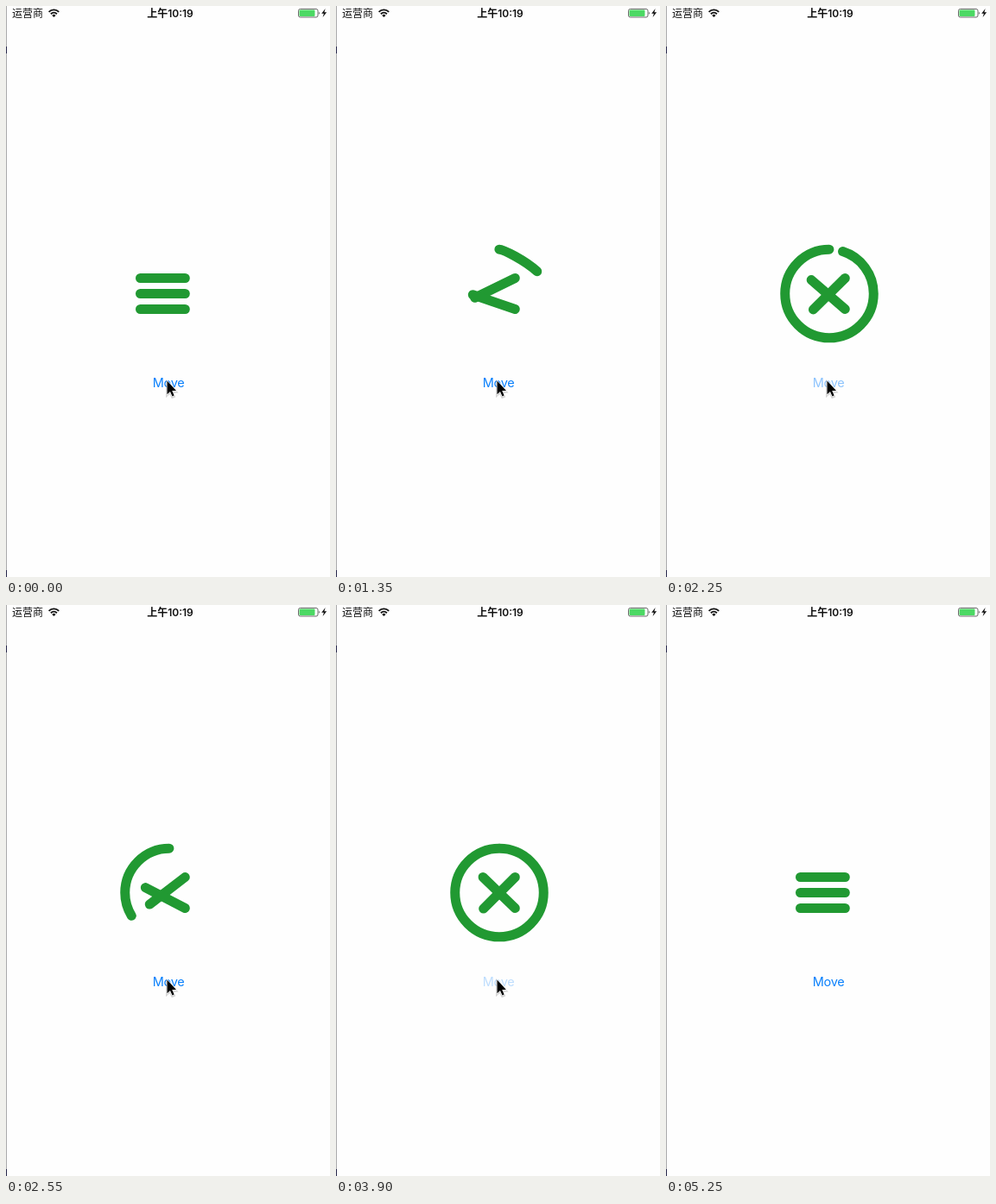
Animation of 375 by 662 pixels, one loop 5500 ms. Source, as an HTML page:

```html
<!DOCTYPE html>
<html lang="zh">
<head>
<meta charset="utf-8">
<title>Menu button</title>
<style>
  html, body { margin: 0; width: 100%; height: 100%; overflow: hidden; background: #fefefe; }
  svg { display: block; width: 375px; height: 662px; }
  text { font-family: Inter, "Noto Sans CJK SC", "Noto Sans CJK", sans-serif; font-size: 12px; fill: #111; }
  #icon { fill: none; stroke: #219932; stroke-width: 11; stroke-linecap: round; stroke-linejoin: round; }
  #label { font-size: 14.5px; letter-spacing: -.3px; fill: #0a80fc; }
</style>
</head>
<body>
<svg viewBox="0 0 375 662">
  <rect width="375" height="662" fill="#fefefe"/>

  <!-- window edge -->
  <path d="M.5 0V662" stroke="#a9a9ab"/>
  <path d="M.5 47V55M.5 654V662" stroke="#26264a"/>

  <!-- status bar -->
  <text x="7" y="12.6">运营商</text>
  <g fill="none" stroke="#111" stroke-width="1.9">
    <path d="M49.6 6.8A8.2 8.2 0 0 1 61.2 6.8"/>
    <path d="M51.9 9.2A5 5 0 0 1 58.9 9.2"/>
  </g>
  <path d="M55.4 13L53.3 10.9A3 3 0 0 1 57.5 10.9Z" fill="#111"/>
  <text x="190" y="12.6" text-anchor="middle" font-weight="600">上午10:19</text>
  <rect x="338.5" y="3.5" width="22.5" height="9.5" rx="2" fill="none" stroke="#5a5a5a" stroke-width=".9"/>
  <rect x="339.5" y="4.5" width="18" height="7.5" rx="1" fill="#4cd964"/>
  <path d="M362 6.5Q363.6 8.2 362 10Z" fill="#333"/>
  <path d="M369.6 3L365.2 8.8H367.9L366.6 13L371.2 7.2H368.4Z" fill="#111"/>

  <g id="icon">
    <path id="top" d="M155.5 315.5H207.3"/>
    <path id="mid" d="M155.5 333.5H207.3C291 333.5 198 282.2 189 282.2A51.3 51.3 0 0 0 189 384.8A51.3 51.3 0 0 0 189 282.2"/>
    <path id="bottom" d="M155.5 351.5H207.3"/>
  </g>

  <text id="label" x="169.8" y="442.2">Move</text>

  <g id="cursor">
    <path d="M0 1.5V18L3.7 14.6L6.3 20L8.9 18.9L6.5 13.5H11.3Z" fill="#000" opacity=".16" stroke="#000" stroke-width="2"/>
    <path d="M.5 .5V16.2L4 12.9L6.5 18.4L8.6 17.5L6.2 12.1H11Z" fill="#000" stroke="#fff" stroke-width="1.1" paint-order="stroke"/>
  </g>
</svg>
<script>
  const LOOP = 5500, STEP = 150, DURATION = 1000, FADE = 0.28;
  const RUNS = [
    { press: 600, start: 770 },
    { press: 2100, start: 2160 },
    { press: 3900, start: 3880 }
  ];
  const CURSOR = [[0, 186, 434], [4350, 201, 443], [4500, 216, 452], [4950, 372, 658], [5250, 400, 700]];

  const [top_, mid, bottom, label, cursor] =
    ["top", "mid", "bottom", "label", "cursor"].map(id => document.getElementById(id));
  const total = mid.getTotalLength();
  const ring = 2 * Math.PI * 51.3;
  const bar = 51.8;
  const ringStart = total - ring;

  const clamp = v => Math.max(0, Math.min(1, v));
  const mix = (a, b, p) => a + (b - a) * p;

  function bezier(x1, y1, x2, y2) {
    const at = (a, b, u) => 3 * a * u * (1 - u) ** 2 + 3 * b * u * u * (1 - u) + u ** 3;
    return x => {
      if (x <= 0 || x >= 1) return clamp(x);
      let lo = 0, hi = 1;
      for (let i = 0; i < 24; i++) {
        const m = (lo + hi) / 2;
        if (at(x1, x2, m) < x) lo = m; else hi = m;
      }
      return at(y1, y2, lo);
    };
  }
  const easeIn = bezier(0.42, 0, 1, 1);
  const easeOut = bezier(0, 0, 0.58, 1);
  const easeTop = bezier(0.63, 0, 0.7, 1);

  function render(t) {
    const run = RUNS.filter(r => r.start <= t).pop();
    const p = run ? clamp((t - run.start) / DURATION) : 1;

    top_.setAttribute("transform", `rotate(${-45 * (1 - easeTop(p))} 207.3 315.5)`);
    bottom.setAttribute("transform", `rotate(${45 * (1 - p)} 207.3 351.5)`);

    // ring unwinds, then the tail runs back to the bar, then its end follows
    const from = mix(ringStart, 0, clamp((p - 0.5) / 0.25));
    const to = p < 0.5
      ? mix(total, ringStart, easeIn(p / 0.5))
      : mix(ringStart, bar, easeOut((p - 0.75) / 0.25));
    mid.setAttribute("stroke-dasharray", `${to - from} ${2 * total}`);
    mid.setAttribute("stroke-dashoffset", -from);

    const held = RUNS.some(r => t >= r.press && t < r.start);
    label.setAttribute("opacity", held ? 0.2 : mix(0.2, 1, clamp(p / FADE)));

    const [, x, y] = CURSOR.filter(c => c[0] <= t).pop();
    cursor.setAttribute("transform", `translate(${x} ${y})`);
  }

  // bars rest flat and turn into a cross around their right ends
  function tick() {
    const t = performance.now() % LOOP;
    render(Math.floor(t / STEP) * STEP);
    requestAnimationFrame(tick);
  }
  tick();
</script>
</body>
</html>
```
